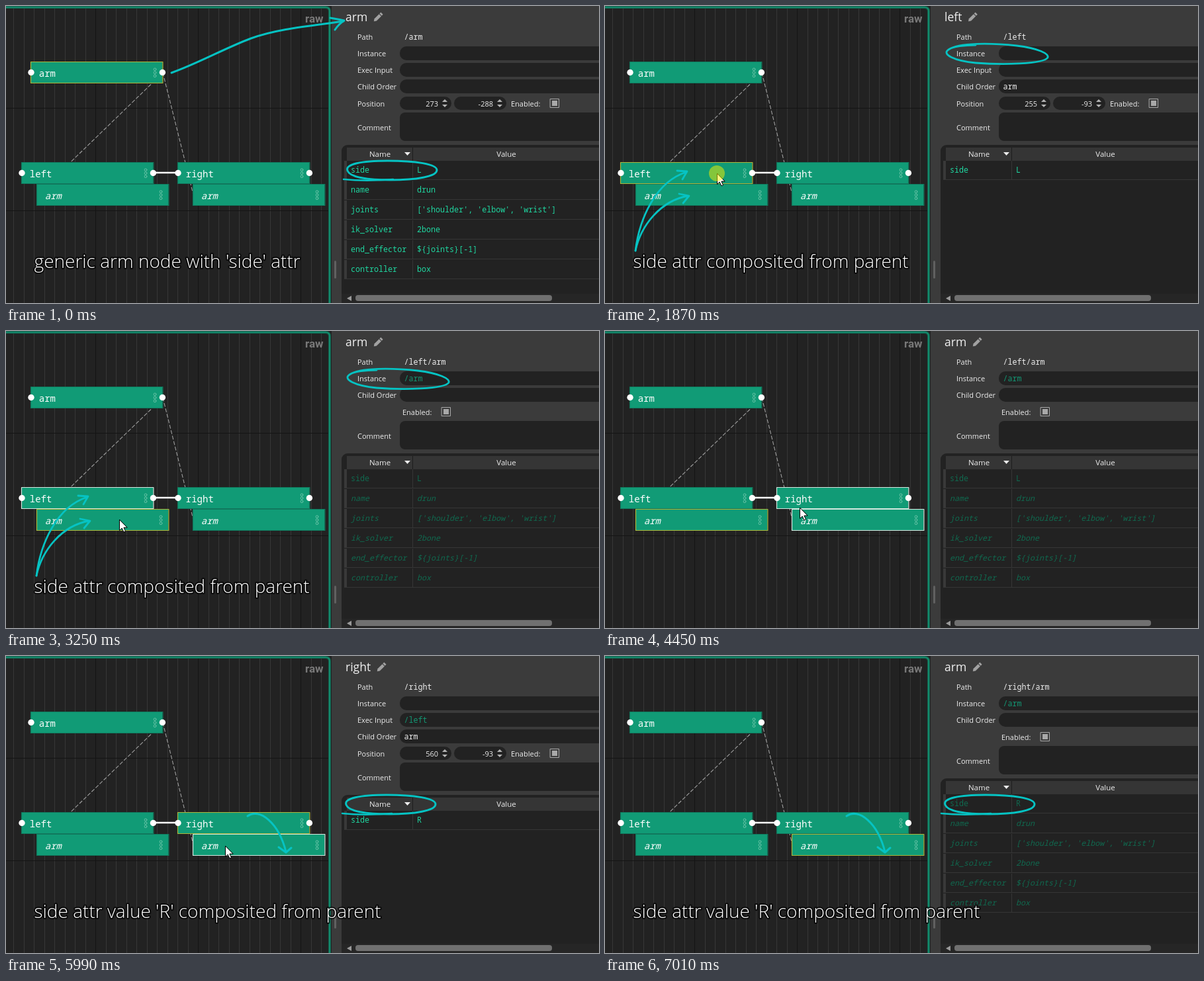
An HTML page with a canvas that plays this animation: 896 by 449 pixels, repeating every 8.22 s.

```html
<!DOCTYPE html>
<html lang="en">
<head>
<meta charset="utf-8">
<title>Node composition</title>
<style>
  html, body { margin: 0; width: 100%; height: 100%; overflow: hidden; background: #3b3b3b; }
  canvas { display: block; }
</style>
</head>
<body>
<canvas id="stage" width="896" height="449"></canvas>
<script>
const ctx = document.getElementById('stage').getContext('2d');
const LOOP = 8220;
const UI = '"Open Sans", "Noto Sans", sans-serif';
const MONO = '"Noto Sans Mono", "DejaVu Sans Mono", monospace';
const GREEN = '#119b76', SELECTED = '#aeb53a', HOVER = '#d4e8e0', INK = '#06c3c3';
const DARK = '#222222', PANEL = '#3b3b3b', LIGHT = '#ededed';

// ---------- helpers ----------
function text(s, x, y, font, color, align = 'left') {
  ctx.font = font;
  ctx.fillStyle = color;
  ctx.textAlign = align;
  ctx.fillText(s, x, y);
}
const label = (s, x, y, align) => text(s, x, y, `11px ${UI}`, LIGHT, align);
const mono = (s, x, y, color = LIGHT, style = '') =>
  text(s, x, y, `${style} 11.7px ${MONO}`, color);

function rect(x, y, w, h, color) {
  ctx.fillStyle = color;
  ctx.fillRect(x, y, w, h);
}
function pill(x, y, w, h, r, color = DARK) {
  ctx.beginPath();
  ctx.roundRect(x, y, w, h, r);
  ctx.fillStyle = color;
  ctx.fill();
}
function poly(points, color) {
  ctx.beginPath();
  points.forEach(([x, y]) => ctx.lineTo(x, y));
  ctx.closePath();
  ctx.fillStyle = color;
  ctx.fill();
}
function dot(x, y, r, color) {
  ctx.beginPath();
  ctx.arc(x, y, r, 0, Math.PI * 2);
  ctx.fillStyle = color;
  ctx.fill();
}
function stroke(d, color, width) {
  ctx.strokeStyle = color;
  ctx.lineWidth = width;
  ctx.stroke(new Path2D(d));
}

// ---------- node graph ----------
const nodes = {
  arm: { x: 38, y: 85, title: 'arm', ports: true },
  left: { x: 24, y: 237, title: 'left', ports: true },
  right: { x: 260, y: 237, title: 'right', ports: true },
  leftArm: { x: 47, y: 270, title: 'arm' },
  rightArm: { x: 283, y: 270, title: 'arm' }
};
const NODE_W = 198.4, NODE_H = 31;

function drawNode(n, outline) {
  rect(n.x, n.y, NODE_W, NODE_H, GREEN);
  ctx.lineWidth = 1.2;
  ctx.strokeStyle = outline || '#11785d';
  ctx.strokeRect(n.x - 0.5, n.y - 0.5, NODE_W + 1, NODE_H + 1);
  ctx.strokeStyle = 'rgba(190,235,215,.5)';
  ctx.lineWidth = 0.9;
  for (let i = -1; i < 2; i++) {
    ctx.beginPath();
    ctx.arc(n.x + 187, n.y + 15.8 + i * 5, 1.9, 0, 7);
    ctx.stroke();
  }
  const style = n.ports ? '' : 'italic';
  text(n.title, n.x + 11.8, n.y + 21.5, `${style} 14px ${MONO}`, '#fff');
}

function drawGraph(outlines) {
  rect(0, 0, 492, 449, DARK);
  for (let i = -8; i < 23; i++) {
    if (i % 10) rect(Math.round(135 + i * 15.5), 3, 1, 446, '#373737');
  }
  for (const x of [135, 290, 445]) rect(x, 3, 1, 446, '#141414');
  for (const y of [154, 309]) rect(0, y, 488, 1, '#141414');

  const frame = 'M-5 2 H483 Q489 2 489 8 V460';
  stroke(frame, '#145f4c', 4);
  stroke(frame, '#139473', 1.6);
  text('raw', 452, 25, 'bold 17px Roboto, sans-serif', '#787878');

  ctx.setLineDash([5, 3.5]);
  stroke('M237 101 L47 285 M237 101 L283 285', '#a0a0a0', 1.1);
  ctx.setLineDash([]);
  for (const id in nodes) drawNode(nodes[id], outlines[id]);
  stroke('M222 252 H260', '#fff', 2.4);
  for (const n of Object.values(nodes)) {
    if (!n.ports) continue;
    dot(n.x, n.y + 15.5, 4.7, '#fff');
    dot(n.x + NODE_W, n.y + 15.5, 4.7, '#fff');
  }
}

// ---------- attribute panel ----------
const armAttrs = side => [
  ['side', side], ['name', 'drun'], ['joints', "['shoulder', 'elbow', 'wrist']"],
  ['ik_solver', '2bone'], ['end_effector', '${joints}[-1]'], ['controller', 'box']
];
const pages = {
  arm: { title: 'arm', path: '/arm', pos: ['273', '-288'], rows: armAttrs('L') },
  left: { title: 'left', path: '/left', order: 'arm', pos: ['255', '-93'], rows: [['side', 'L']] },
  right: { title: 'right', path: '/right', exec: '/left', order: 'arm', pos: ['560', '-93'], rows: [['side', 'R']] },
  leftArm: { title: 'arm', path: '/left/arm', instance: '/arm', rows: armAttrs('L') },
  rightArm: { title: 'arm', path: '/right/arm', instance: '/arm', rows: armAttrs('R') }
};

function drawPencil(x, y) {
  ctx.save();
  ctx.translate(x, y);
  ctx.rotate(-Math.PI / 4);
  poly([[-9, 0], [-5.5, -2.3], [4.5, -2.3], [4.5, 2.3], [-5.5, 2.3]], '#a2a2a2');
  rect(5.5, -2.3, 2.8, 4.6, '#a2a2a2');
  ctx.restore();
}
function field(name, y, value = '', color = LIGHT) {
  label(name, 531, y + 4);
  pill(595, y - 11, 330, 21, 10);
  mono(value, 601.5, y + 4, color);
}
function spinner(x, w, value) {
  pill(x, 137, w, 20, 10);
  label(value, x + w - 20, 152, 'right');
  const c = x + w - 10;
  poly([[c - 4, 145], [c, 141], [c + 4, 145]], '#b4b4b4');
  poly([[c - 4, 149], [c + 4, 149], [c, 153]], '#b4b4b4');
}
function checkbox(x, y) {
  ctx.strokeStyle = '#a8a8a8';
  ctx.lineWidth = 1;
  ctx.strokeRect(x - 6.5, y - 6.5, 13, 13);
  rect(x - 4, y - 4, 8, 8, '#a8a8a8');
}

function drawTable(top, rows, inherited) {
  pill(507, top, 400, 260, [9, 0, 0, 0]);
  rect(515, top + 4, 381, 20, '#353535');
  rect(614, top + 4, 1, 20, '#1d1d1d');
  const head = `11.5px ${UI}`;
  text('Name', 565, top + 18, head, LIGHT, 'center');
  text('Value', 756, top + 18, head, LIGHT, 'center');
  poly([[602, top + 11], [611, top + 11], [606.5, top + 16]], LIGHT);

  const color = inherited ? '#10694f' : '#1fd6a0';
  rows.forEach(([name, value], i) => {
    const y = top + 24 + i * 30;
    rect(511, y, 4, 28, '#393939');
    rect(511, y + 28, 385, 1, '#363636');
    rect(614, y, 1, 29, '#363636');
    const style = inherited && i ? 'italic' : '';
    mono(name, 521, y + 18, color, style);
    mono(value, 621, y + 18, color, style);
  });

  rect(507, 435, 389, 14, '#262626');
  poly([[515, 442], [522, 438], [522, 446]], '#9a9a9a');
  pill(528, 437, 297, 9, 4, '#707070');
}

function drawPanel(id) {
  const p = pages[id];
  rect(492, 0, 404, 449, PANEL);
  pill(496, 385, 3, 27, 1.5, '#606060');
  text(p.title, 513, 22.5, `17.5px ${UI}`, '#f0f0f0');
  drawPencil(513 + ctx.measureText(p.title).width + 16, 17);
  label('Path', 531, 51);
  mono(p.path, 601.5, 51);
  field('Instance', 72, p.instance, '#139673');
  let shift = 0;
  if (p.pos) {
    field('Exec Input', 97, p.exec, '#139673');
    field('Child Order', 122, p.order);
    label('Position', 531, 152);
    spinner(595, 78, p.pos[0]);
    spinner(677, 79, p.pos[1]);
    label('Enabled:', 763, 152);
    checkbox(829, 147);
  } else {
    shift = -25;
    field('Child Order', 97);
    label('Enabled:', 599, 127);
    checkbox(665, 122);
  }
  label('Comment', 531, 188 + shift);
  pill(595, 161 + shift, 330, 43, 8);
  drawTable(210 + shift, p.rows, !p.pos);
}

// ---------- hand-drawn notes ----------
function loopMark(dx, dy) {
  ctx.save();
  ctx.translate(dx, dy);
  stroke('M3 15 C-1 5 24 0 64 0 C106 0 138 5 138 14 C138 24 106 29 68 29 C34 29 7 25 3 15', INK, 3);
  stroke('M-3 28 C16 30 48 30 72 28', INK, 2.4);
  ctx.restore();
}
const notes = [
  { from: 0, to: 1870, caption: "generic arm node with 'side' attr", draw() {
    stroke('M250 101 C292 86 330 64 370 49 C412 34 462 30 510 23', INK, 3);
    stroke('M490 18 Q502 20 511 22 Q503 27 497 36', INK, 3);
    loopMark(513, 234);
  } },
  { from: 1870, to: 4450, caption: 'side attr composited from parent', draw() {
    stroke('M46 370 C52 322 76 266 123 251 M109 249 L124 250 L117 262', INK, 2.8);
    stroke('M46 370 C54 332 84 294 126 287 M112 284 L127 287 L118 298', INK, 2.8);
    stroke('M519 66 C534 55 585 56 622 60 C655 64 671 72 669 78 C662 88 600 89 560 86 C528 83 508 73 519 66 C525 61 545 59 560 59', INK, 2.8);
  } },
  { from: 5290, to: LOOP, caption: "side attr value 'R' composited from parent", draw() {
    stroke('M365 242 C383 229 412 252 423 296 M412 289 L423 297 L431 290', INK, 3);
    loopMark(511, 210);
  } }
];
function drawNote(n) {
  n.draw();
  ctx.font = `300 28px ${UI}`;
  ctx.textAlign = 'left';
  ctx.strokeStyle = 'rgba(0,0,0,.7)';
  ctx.lineWidth = 4;
  ctx.strokeText(n.caption, 42.5, 396);
  text(n.caption, 42.5, 396, ctx.font, '#fff');
}

// ---------- pointer ----------
function drawArrow(x, y) {
  ctx.save();
  ctx.translate(x + 0.5, y + 0.5);
  const shape = 'M0 0 V16 L3.7 12.6 L6.4 18.4 L9 17.3 L6.4 11.6 H11.3 Z';
  ctx.fillStyle = '#fff';
  ctx.fill(new Path2D(shape));
  stroke(shape, '#000', 1);
  ctx.restore();
}
function drawSplit(x, y) {
  const shape = 'M-2 -9 V9 M2 -9 V9 M-2 0 H-10 M2 0 H10 M-7 -3 L-10 0 L-7 3 M7 -3 L10 0 L7 3';
  ctx.save();
  ctx.translate(x, y);
  stroke(shape, '#fff', 3);
  stroke(shape, '#000', 1);
  ctx.restore();
}

// Pointer stops: time, x, y
const stops = [
  [1180, 738, 430], [1350, 319, 309], [1510, 218, 268], [1700, 171, 253],
  [1870, 169, 253], [2380, 172, 254], [2570, 176, 255], [2900, 170, 272],
  [3070, 171, 283], [3250, 171, 285], [4450, 294, 267], [4610, 305, 267],
  [4780, 324, 258], [5640, 326, 261], [5810, 329, 279], [5990, 331, 287]
];
const clicks = [[1870, 2050, 169, 253], [5130, 5290, 324, 258], [6330, 6490, 331, 288]];
const selection = [[0, 'arm'], [1870, 'left'], [3250, 'leftArm'], [5130, 'right'], [6330, 'rightArm']];
const hovers = [
  [1510, 1870, 'left'], [2900, 3250, 'leftArm'], [3250, 4450, 'left'],
  [4450, 5130, 'right'], [4450, 4610, 'rightArm'], [5810, 6330, 'rightArm'], [6330, 6840, 'right']
];
const latest = (list, t) => list.findLast(([at]) => at <= t);

function render(t) {
  const selected = latest(selection, t)[1];
  const outlines = {};
  for (const [a, b, id] of hovers) if (t >= a && t < b) outlines[id] = HOVER;
  outlines[selected] = SELECTED;

  ctx.lineCap = ctx.lineJoin = 'round';
  drawGraph(outlines);
  drawPanel(selected);
  for (const n of notes) if (t >= n.from && t < n.to) drawNote(n);

  const stop = latest(stops, t);
  if (t >= 6840 && t < 7010) drawSplit(495.5, 359.5);
  else if (stop && t < 6840) drawArrow(stop[1], stop[2]);
  for (const [a, b, x, y] of clicks) {
    if (t >= a && t < b) dot(x, y, 12, 'rgba(247,241,0,.5)');
  }
}

const start = performance.now();
function tick() {
  render((performance.now() - start) % LOOP);
  requestAnimationFrame(tick);
}
tick();
</script>
</body>
</html>
```
